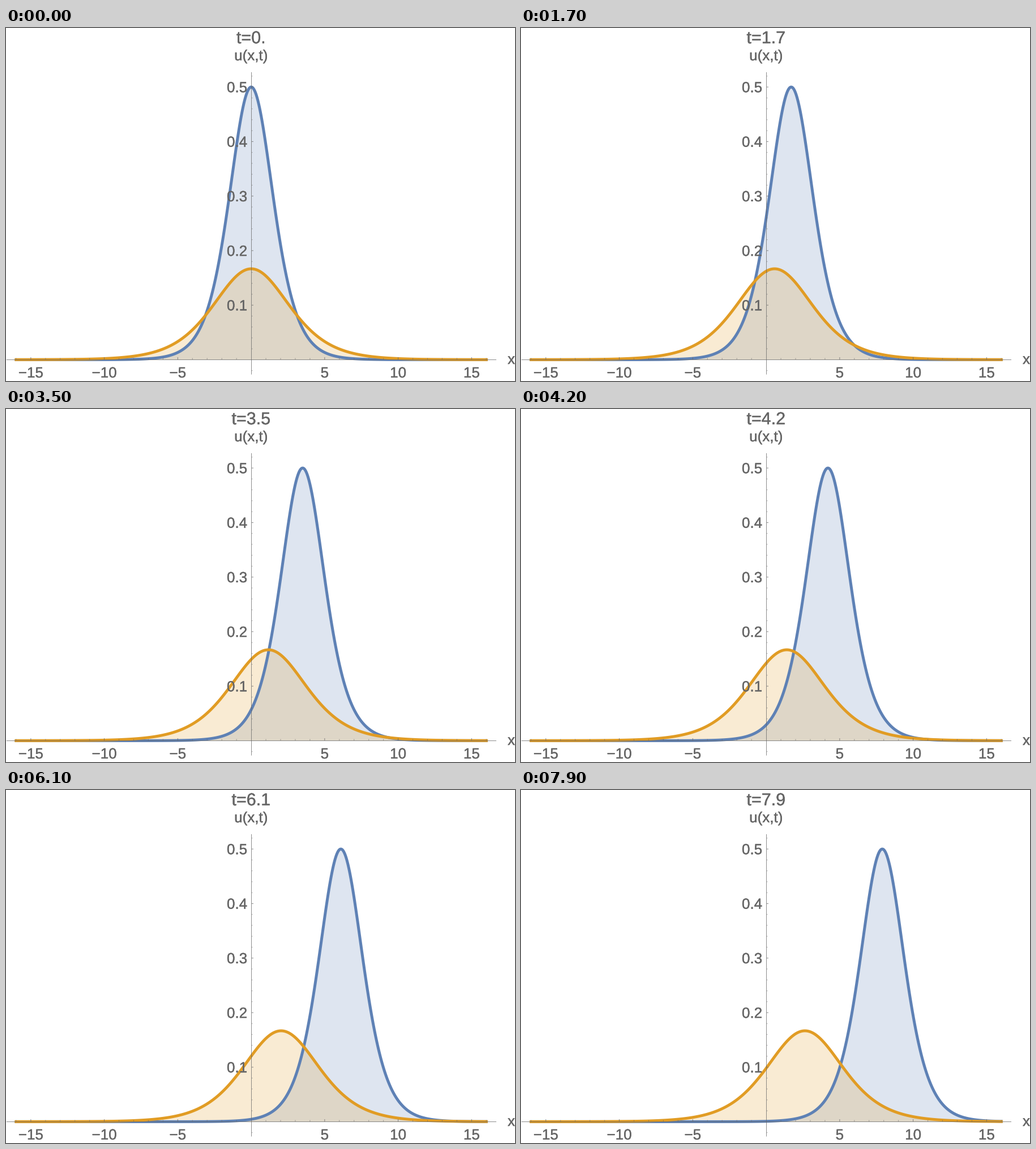
These frames come from a looping animation (899x623 px, 8000 ms). A matplotlib script:

```python
import numpy as np
import matplotlib
import matplotlib.pyplot as plt
from matplotlib.animation import FuncAnimation
from matplotlib.patheffects import withStroke

matplotlib.rcParams["font.family"] = "Liberation Sans"
matplotlib.rcParams["text.hinting"] = "none"
matplotlib.rcParams["path.simplify"] = False

W, H, DPI = 899, 623, 64
PX = 72 / DPI                    # points per pixel
X0, Y0 = 433.1, 585.4            # plot origin in pixels
SX, SY = 25.95, 962.5            # pixels per unit
FRAMES, STEP = 80, 100
GRAY = "#666666"
TEXT, TITLE = 26, 30.5

# advance widths in em, used to centre labels on their ticks
ADVANCE = {".": 0.278, "t": 0.278, "=": 0.584, "\u2212": 0.584}

fig = plt.figure(figsize=(W / DPI, H / DPI), dpi=DPI, facecolor="white")
ax = fig.add_axes([0, 0, 1, 1])
ax.set_xlim(0, W)
ax.set_ylim(H, 0)
ax.axis("off")


def px(x):
    return X0 + SX * x


def py(u):
    return Y0 - SY * u


def start(s, centre, size):
    return centre - size * sum(ADVANCE.get(ch, 0.556) for ch in s) / 2


def label(x, base, s, size=TEXT):
    # a hairline stroke gives the slightly heavy look of smoothed type
    return ax.text(x, base, s, size=size * PX, color=GRAY,
                   ha="left", va="baseline", zorder=5,
                   path_effects=[withStroke(linewidth=0.4 * PX, foreground=GRAY)])


def rule(xs, ys, alpha=0.75):
    ax.plot(xs, ys, color=GRAY, lw=PX, alpha=alpha, zorder=4,
            solid_capstyle="butt", snap=False)


def soliton(x, t, c):
    return c / 2 / np.cosh(np.sqrt(c) / 2 * (x - c * t)) ** 2


def draw_axes():
    rule([1, 866], [585.5, 585.5])
    rule([433.5, 433.5], [78, 611.5])
    for n in range(-16, 17):
        if n == 0:
            continue
        major = n % 5 == 0
        rule([px(n)] * 2, [585, 581 if major else 582.5],
             0.75 if major else 0.55)
        if major:
            s = str(n).replace("-", "\u2212")
            label(start(s, px(n), TEXT), 616.8, s)
    for n in range(-1, 27):
        if n == 0:
            continue
        major = n % 5 == 0
        rule([434, 437 if major else 435.5], [py(n / 50)] * 2,
             0.75 if major else 0.55)
        if major:
            label(390, py(n / 50) + 9.2, f"{n / 50:.1f}")
    label(886, 593, "x")
    label(403.2, 57, "u(x,t)")


xs = np.linspace(-16, 16, 801)
waves = []
for z, (c, color) in enumerate([(1, "#5e81b5"), (1 / 3, "#e19c24")]):
    area, = ax.fill([0, 0], [0, 0], color=color, alpha=0.2, lw=0, zorder=1 + z / 10)
    line, = ax.plot([], [], color=color, lw=5 * PX, zorder=2 + z / 10,
                    solid_capstyle="projecting", solid_joinstyle="round")
    waves.append((c, area, line))

draw_axes()
title = label(0, 27, "", TITLE)


def update(i):
    t = i / 10
    s = f"t={t:.1f}" if i % 10 else f"t={i // 10}."
    title.set_text(s)
    title.set_x(start(s, 432.8, TITLE))
    for c, area, line in waves:
        x, y = px(xs), py(soliton(xs, t, c))
        line.set_data(x, y)
        area.set_xy(np.column_stack([np.r_[x[0], x, x[-1]], np.r_[Y0, y, Y0]]))
    return [title]


anim = FuncAnimation(fig, update, frames=FRAMES, interval=STEP,
                     repeat=True, repeat_delay=0, blit=False)
plt.show()
```
